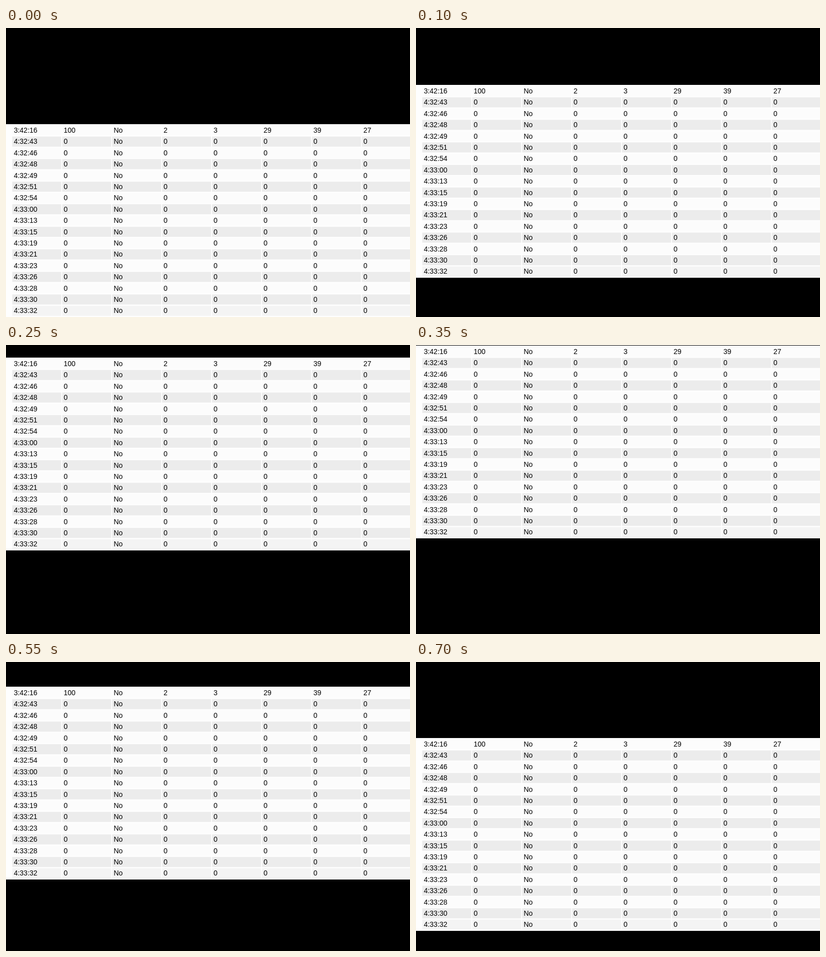
An HTML page with a canvas for the animation above (0.75 s loop, 800 px wide and 574 px high).

```html
<!DOCTYPE html>
<html lang="en">
<head>
<meta charset="utf-8">
<title>Bouncing table</title>
<style>
  html, body { margin: 0; width: 100%; height: 100%; overflow: hidden; background: #000; }
  canvas { display: block; }
</style>
</head>
<body>
<canvas id="stage" width="800" height="574"></canvas>
<script>
const W = 800, H = 574, LOOP = 750, STEP = 50;
const TABLE_H = 383, ROW_H = 22.4, COL_W = 98.9;
const ctx = document.getElementById('stage').getContext('2d');

const times = ['3:42:16',
  ...['43', '46', '48', '49', '51', '54'].map(s => '4:32:' + s),
  ...['00', '13', '15', '19', '21', '23', '26', '28', '30', '32'].map(s => '4:33:' + s)];
const rows = times.map((time, i) =>
  [time, ...(i ? '0 No 0 0 0 0 0' : '100 No 2 3 29 39 27').split(' ')]);

function rowColor(i) {
  if (i === rows.length - 1) return '#f4f4f4';
  return i % 2 ? '#ececec' : '#fcfcfc';
}

function drawTable() {
  ctx.fillStyle = '#fefefe';
  ctx.fillRect(0, 0, W, TABLE_H);
  ctx.font = '14px "Liberation Sans", Arial, sans-serif';
  rows.forEach((cells, i) => cells.forEach((text, j) => {
    const x = 12.4 + j * COL_W, y = 2.2 + i * ROW_H;
    ctx.fillStyle = rowColor(i);
    ctx.fillRect(x, y, 97, 20);
    ctx.fillStyle = '#000';
    ctx.fillText(text, x + 3, y + 14.8);
  }));
}

function draw(now) {
  const t = Math.floor(now % LOOP / STEP) * STEP;
  const top = Math.floor(H / 3 * (1 - Math.sin(Math.PI * t / LOOP)));
  ctx.fillStyle = '#000';
  ctx.fillRect(0, 0, W, H);
  ctx.save();
  ctx.translate(0, top);
  drawTable();
  ctx.restore();
}

const start = performance.now();
function tick() {
  draw(performance.now() - start);
  requestAnimationFrame(tick);
}
tick();
</script>
</body>
</html>
```
